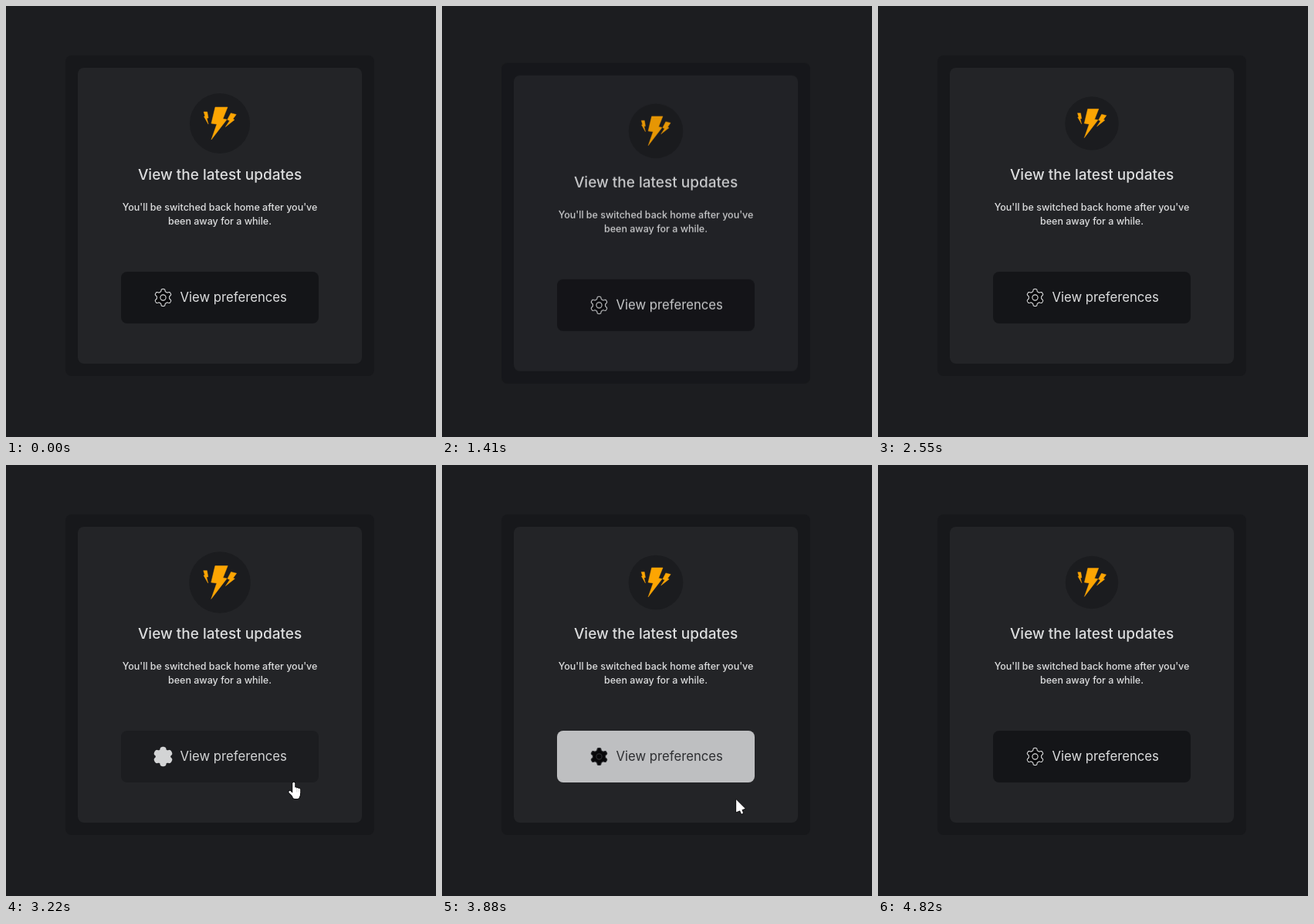
These frames come from a looping animation (557 px wide and 558 px high, 4.88 s). An HTML page with a canvas:

```html
<!DOCTYPE html>
<html lang="en">
<head>
<meta charset="utf-8">
<title>View the latest updates</title>
<style>
html, body { margin: 0; width: 100%; height: 100%; overflow: hidden; background: #1c1d20; }
canvas { display: block; }
</style>
</head>
<body>
<canvas id="stage" width="557" height="558"></canvas>
<script>
const LOOP = 4880;
const RELOAD = 715, ENTER = 785, ENTER_TIME = 1000;
const PULSE = 1250;
const HOVER_ON = 3190, HOVER_OFF = 3830, HOVER_TIME = 500;
const ARRIVE = 2800, ARRIVE_TIME = 663, LEAVE = 3733, LEAVE_TIME = 564;

const DARK = [20, 21, 24], LIGHT = [208, 209, 211];
const INK = [220, 221, 222], HOVER_INK = [27, 28, 31];

const stage = document.getElementById('stage');
const screen = stage.getContext('2d');
const layer = document.createElement('canvas');
layer.width = stage.width;
layer.height = stage.height;
const c = layer.getContext('2d');

const clamp = v => Math.min(1, Math.max(0, v));
const mix = (a, b, k) => a + (b - a) * k;
const rgb = (a, b, k) => `rgb(${a.map((v, i) => Math.round(mix(v, b[i], k)))})`;

// cubic-bezier(.25, .1, .25, 1)
function ease(x) {
  x = clamp(x);
  if (x === 0 || x === 1) return x;
  const bezier = (p, q, u) => 3 * p * u * (1 - u) ** 2 + 3 * q * u * u * (1 - u) + u ** 3;
  let low = 0, high = 1;
  for (let i = 0; i < 24; i++) {
    const mid = (low + high) / 2;
    if (bezier(.25, .25, mid) < x) low = mid; else high = mid;
  }
  return bezier(.1, 1, low);
}

// Alternating pulse: quick fall from the peak, mirrored on the way back.
function badgeRadius(t) {
  const peak = t < RELOAD ? 170 : ENTER;
  const phase = Math.abs(t - peak) / PULSE % 2;
  return mix(40, 34, ease(phase > 1 ? 2 - phase : phase));
}

function hoverAmount(t) {
  return t < HOVER_OFF
    ? ease((t - HOVER_ON) / HOVER_TIME)
    : 1 - ease((t - HOVER_OFF) / HOVER_TIME);
}

const isHovered = t => t >= HOVER_ON && t < HOVER_OFF;

function box(x, y, w, h, color) {
  c.fillStyle = color;
  c.beginPath();
  c.roundRect(x, y, w, h, 8);
  c.fill();
}

function disc(radius) {
  c.beginPath();
  c.arc(0, 0, radius, 0, Math.PI * 2);
}

function text(str, x, y, size, weight, color, align = 'center') {
  c.font = `${weight} ${size}px Inter, sans-serif`;
  c.textAlign = align;
  c.fillStyle = color;
  c.fillText(str, x, y);
}

function bolt(x, y, sx, sy, tilt) {
  c.save();
  c.translate(x, y);
  c.rotate(tilt);
  c.scale(sx, sy);
  c.beginPath();
  c.moveTo(-6, -21);
  c.lineTo(10, -21);
  c.lineTo(4, -6);
  c.lineTo(9, -5);
  c.lineTo(-11, 21);
  c.lineTo(-4, 1);
  c.lineTo(-11, 0);
  c.closePath();
  c.restore();
  c.stroke();
  c.fill();
}

function badge(radius) {
  c.save();
  c.translate(277, 152);
  c.scale(radius / 39, radius / 39);
  c.fillStyle = '#1b1c1f';
  disc(39);
  c.fill();
  c.lineWidth = .8;
  c.strokeStyle = '#a66f16';
  c.fillStyle = '#fda502';
  bolt(0, 0, 1, 1, 0);
  bolt(14.5, -3.5, .45, .45, .25);
  bolt(-18, -7, -.28, .38, 0);
  c.restore();
}

function gear(color, hovered) {
  c.save();
  c.translate(203.5, 377.5);
  c.lineJoin = 'round';
  c.lineWidth = hovered ? 3.2 : 1.1;
  c.strokeStyle = color;
  c.fillStyle = hovered ? color : '#08080a';
  c.beginPath();
  for (let i = 0; i < 120; i++) {
    const a = i * Math.PI / 60;
    const r = 9.6 + 1.5 * Math.tanh(2.5 * Math.cos(6 * a));
    c.lineTo(r * Math.sin(a), -r * Math.cos(a));
  }
  c.closePath();
  c.fill();
  c.stroke();
  disc(3.6);
  c.stroke();
  c.restore();
}

function card(t) {
  const hover = hoverAmount(t);
  const ink = rgb(INK, HOVER_INK, hover);
  const plain = rgb(INK, INK, 0);
  c.clearRect(0, 0, layer.width, layer.height);
  box(77, 64, 400, 415, '#17181b');
  box(93, 80, 368, 383, '#232427');
  badge(badgeRadius(t));
  text('View the latest updates', 277, 225, 19, 550, plain);
  text("You'll be switched back home after you've", 277, 265, 12.5, 450, plain);
  text('been away for a while.', 277, 283, 12.5, 450, plain);
  box(149, 344, 256, 67, rgb(DARK, LIGHT, hover));
  gear(ink, isHovered(t));
  text('View preferences', 225.5, 383, 16.7, 400, ink, 'left');
}

function line(x0, y0, x1, y1, width) {
  screen.lineWidth = width;
  screen.beginPath();
  screen.moveTo(x0, y0);
  screen.lineTo(x1, y1);
  screen.stroke();
}

function hand(grow) {
  line(0, 1.6, 0, 14, 3 + grow);
  for (let i = 1; i < 4; i++) line(2.4 * i, 7 + i * .8, 2.4 * i, 14, 2.6 + grow);
  line(-5, 12.5, 0, 17.5, 2.8 + grow);
  line(1, 16, 5, 16, 6.5 + grow);
  line(1.5, 18.5, 4.5, 18.5, 5.5 + grow);
}

function arrow(grow) {
  line(5, 11, 7.4, 17, 2.6 + grow);
  screen.lineWidth = Math.max(grow, .1);
  screen.beginPath();
  screen.moveTo(0, 0);
  screen.lineTo(0, 16);
  screen.lineTo(11.5, 11.5);
  screen.closePath();
  screen.stroke();
  screen.fill();
}

function pointer(t) {
  const arriving = t < LEAVE;
  const gone = arriving
    ? (1 - clamp((t - ARRIVE) / ARRIVE_TIME)) ** 2
    : clamp((t - LEAVE) / LEAVE_TIME);
  if (gone === 1) return;
  screen.save();
  screen.translate(mix(350.4, arriving ? 518 : 467.6, gone), mix(387.4, 562, gone));
  screen.lineCap = screen.lineJoin = 'round';
  const shape = isHovered(t) ? hand : arrow;
  for (const [color, grow] of [['#08080a', 1.6], ['#fff', 0]]) {
    screen.strokeStyle = screen.fillStyle = color;
    shape(grow);
  }
  screen.restore();
}

function draw(now) {
  const t = now % LOOP;
  const shown = t < RELOAD ? 1 : ease((t - ENTER) / ENTER_TIME);
  screen.fillStyle = '#1c1d20';
  screen.fillRect(0, 0, stage.width, stage.height);
  if (shown > 0) {
    card(t);
    screen.globalAlpha = shown;
    screen.drawImage(layer, 0, 100 * (1 - shown));
    screen.globalAlpha = 1;
  }
  pointer(t);
}

const start = performance.now();
function tick() {
  draw(performance.now() - start);
  requestAnimationFrame(tick);
}
tick();
</script>
</body>
</html>
```
